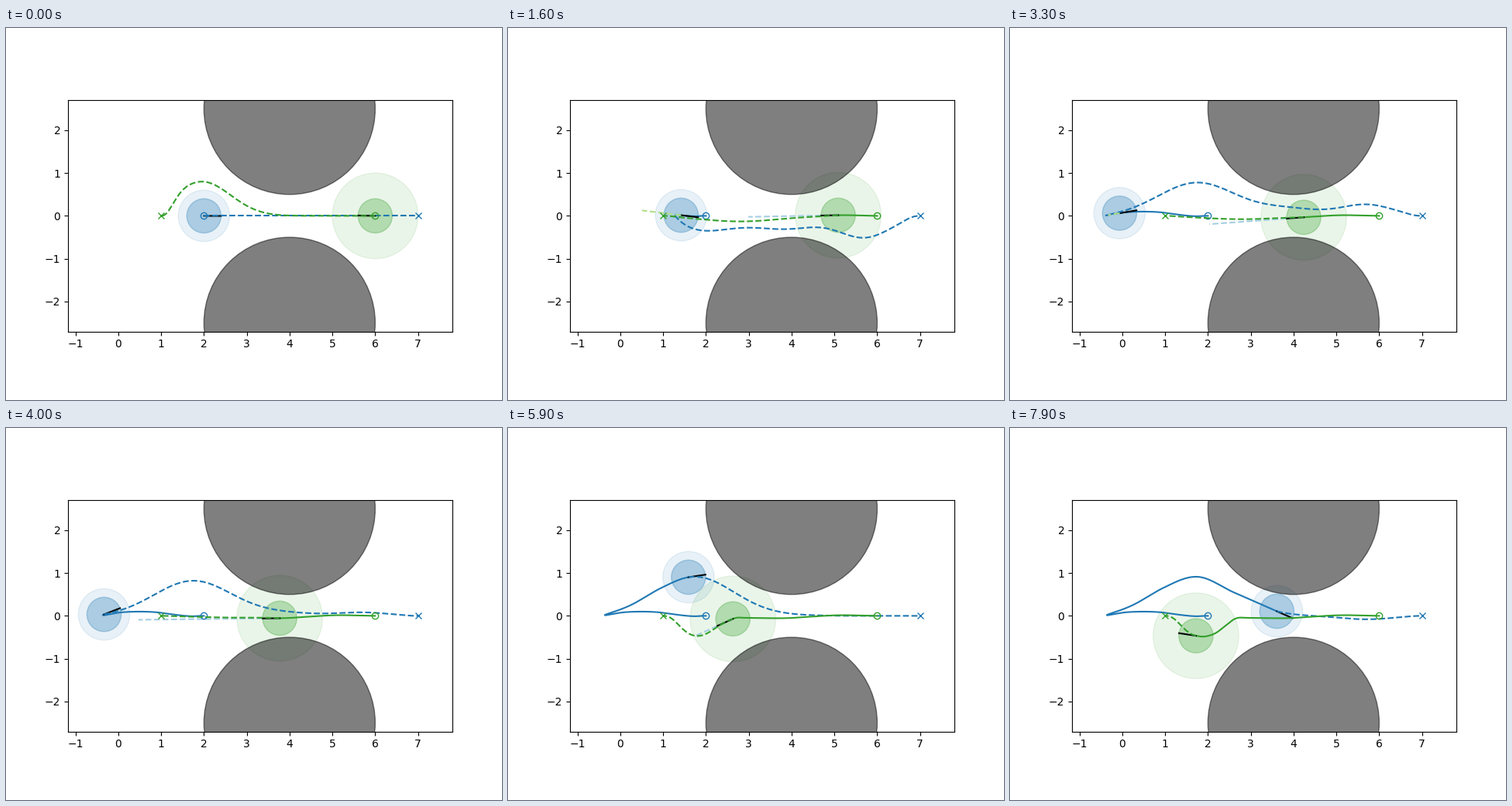
Recreate the animation shown at these times as a matplotlib script. Size 640 px wide and 480 px high, loop 8 s.

```python
import numpy as np
import matplotlib.pyplot as plt
from matplotlib.animation import FuncAnimation

FRAMES, STEP = 80, 0.1
NOSE = 0.4
KEYS = [0, 1.6, 2.7, 4, 4.8, 5.9, 7.9]


def spline(keys):
    """Smooth path through (t, x, y) keys."""
    keys = np.array(keys, float)
    t, p = keys[:, 0], keys[:, 1:]
    m = np.gradient(p, t, axis=0)

    def at(q):
        q = np.clip(np.atleast_1d(q), t[0], t[-1])
        i = np.clip(np.searchsorted(t, q, side="right") - 1, 0, len(t) - 2)
        h = (t[i + 1] - t[i])[:, None]
        s = (q - t[i])[:, None] / h
        ease = s * s * (3 - 2 * s)
        return ((1 - ease) * p[i] + ease * p[i + 1]
                + h * s * (1 - s) * ((1 - s) * m[i] - s * m[i + 1]))

    return at


class Robot:
    """Drives along keyed points and plans a path of Gaussian swerves to its goal."""

    def __init__(self, way, goal, bumps, reach, backup=(0,) * len(KEYS)):
        self.way, self.goal, self.bumps = spline(way), goal, bumps
        self.reach, self.backup = reach, backup
        self.facing = np.sign(goal - way[0][1])

    def pos(self, t):
        return self.way(t)[0]

    def driven(self, t):
        return self.way(np.linspace(0, t, int(t * 40) + 2))

    def ahead(self, t, length):
        d = self.way(np.linspace(t - .2, t + .2, 9))
        d = d - d.mean(axis=0)
        slope = (d[:, 0] @ d[:, 1]) / (d[:, 0] @ d[:, 0])
        step = self.facing * np.array([1, slope]) / np.hypot(1, slope)
        return np.array([self.pos(t), self.pos(t) + length * step])

    def guess(self, t):
        return self.ahead(t, np.interp(t, KEYS, self.reach))

    def swerve(self, x, t):
        y = sum(np.interp(t, KEYS, amps) * np.exp(-((x - c) / w) ** 2)
                for c, w, amps in self.bumps)
        return y * (1 - np.exp(-((x - self.goal) / .3) ** 2))

    def plan(self, t):
        start, turn = self.ahead(t, -np.interp(t, KEYS, self.backup))
        x = np.linspace(turn[0], self.goal, 200)
        miss = turn[1] - self.swerve(turn[0], t)
        y = self.swerve(x, t) + miss * np.exp(-np.abs(x - turn[0]) / .35)
        return np.vstack([start, np.column_stack([x, y])])


blue = Robot(
    way=[(0, 2, 0), (1.6, 1.42, .015), (2.2, .88, .085), (3.1, .1, .085),
         (3.8, -.36, .015), (4.8, .34, .3), (5.3, .95, .65), (6.05, 1.75, .913),
         (6.85, 2.6, .55), (7.9, 3.61, .107)],
    goal=7,
    bumps=[(1.75, 1.28, [0, -.4, .74, .82, .84, .91, .91]),
           (3.9, 1, [0, -.28, .24, .06, .03, .01, 0]),
           (5.7, .85, [0, -.5, .42, .08, -.03, 0, -.08])],
    reach=[0, -.92, -.5, 0, 0, 0, 0],
    backup=[0, .17, .6, 0, 0, 0, 0])

green = Robot(
    way=[(0, 6, 0), (1.6, 5.09, .015), (2.7, 4.57, -.01), (4, 3.77, -.055),
         (4.8, 3.07, -.05), (5.9, 2.63, -.07), (6.5, 2.45, -.2), (7.2, 2.12, -.43),
         (7.6, 1.89, -.485), (7.9, 1.72, -.465)],
    goal=1,
    bumps=[(1.95, .95, [.8, 0, 0, 0, 0, 0, 0]),
           (2.8, 1.3, [0, -.13, -.11, -.04, -.04, 0, 0]),
           (1.8, .6, [0, 0, 0, 0, 0, -.47, -.48])],
    reach=[0, 2.1, 1.28, 3.3, 2.45, .95, .4])

fig, ax = plt.subplots(figsize=(6.4, 4.8), dpi=100)
ax.set_aspect("equal")
ax.set(xlim=(-1.175, 7.803), ylim=(-2.7, 2.7))


def disc(r, color, alpha, center=(0, 0)):
    return ax.add_patch(plt.Circle(center, r, color=color, alpha=alpha))


def line(color, style="-"):
    return ax.plot([], [], style, color=color)[0]


def build(robot, other, color, tint, margin):
    discs = [disc(margin, color, .1), disc(.4, color, .3)]
    lines = [(line(tint, "--"), other.guess),
             (line(color), robot.driven),
             (line("k"), lambda t: robot.ahead(t, NOSE)),
             (line(color, "--"), robot.plan)]
    ax.plot(*robot.pos(0), "o", color=color, mfc="none")
    ax.plot(robot.goal, 0, "x", color=color)
    return robot, discs, lines


crew = [build(blue, green, "#1f78b4", "#a6cee3", .6),
        build(green, blue, "#33a02c", "#b2df8a", 1)]
for side in (-1, 1):
    disc(2, "k", .5, (4, 2.5 * side))


def draw(i):
    t = i * STEP
    for robot, discs, lines in crew:
        for d in discs:
            d.center = tuple(robot.pos(t))
        for artist, path in lines:
            artist.set_data(*path(t).T)
    return []


anim = FuncAnimation(fig, draw, frames=FRAMES, interval=100, repeat=True, repeat_delay=0)
plt.show()
```
